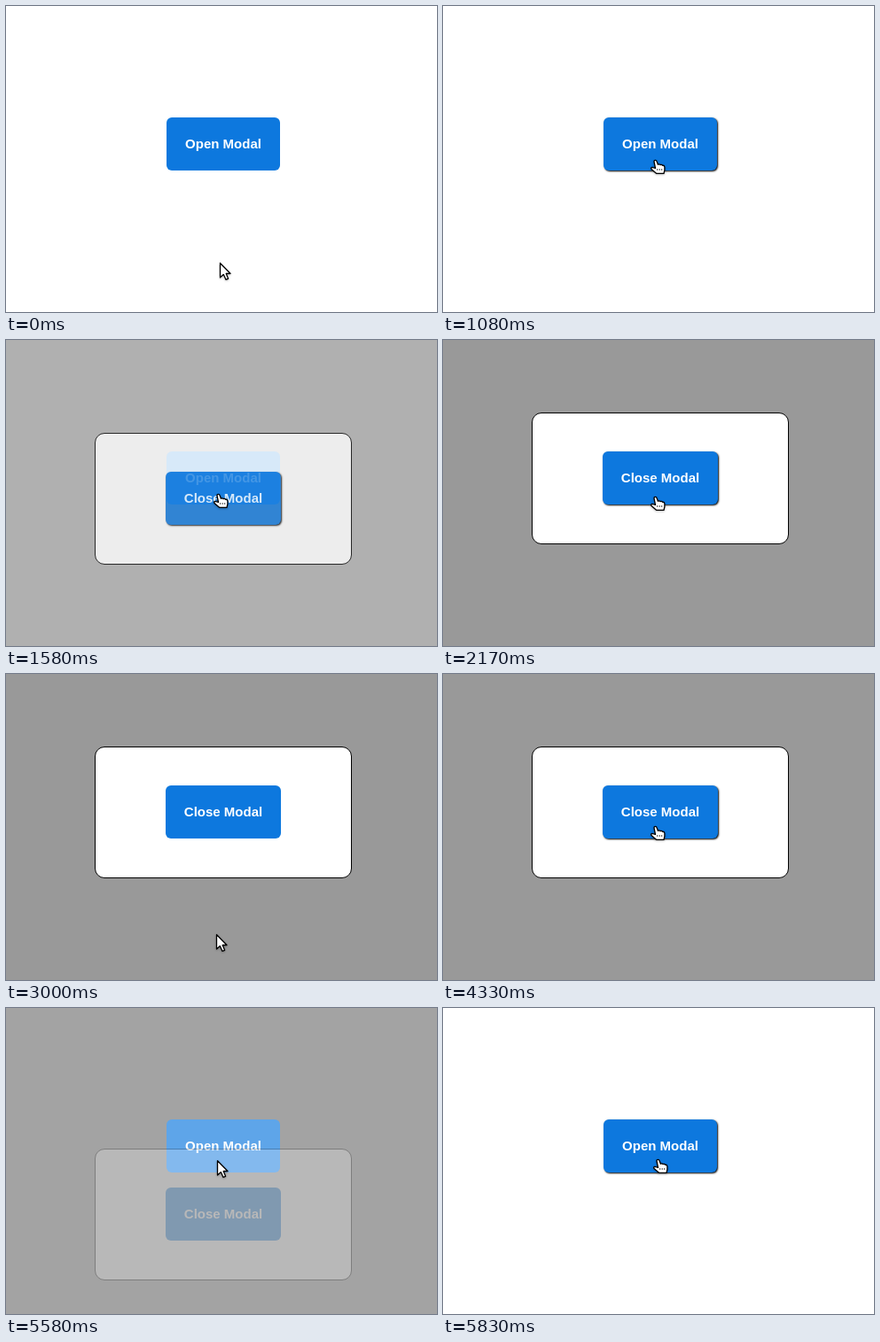
Recreate the animation shown at these times as an HTML page. Size 486 by 346 pixels, loop 7760 ms.

```html
<!DOCTYPE html>
<html lang="en">
<head>
<meta charset="utf-8">
<title>Modal</title>
<style>
  html, body { margin: 0; width: 100%; height: 100%; overflow: hidden; background: #fff; }
  #backdrop { position: absolute; inset: 0; background: #000; }
  .box {
    position: absolute; left: 100px; top: 82px; width: 290px; height: 149px;
    box-sizing: border-box; border: 1px solid transparent; border-radius: 11px;
    display: flex; justify-content: center; align-items: flex-start;
  }
  #modal { background: #fff; border-color: #000; }
  .button {
    margin-top: 43px; padding: 0 21px; border-radius: 6px; background: #0d78de; color: #fff;
    font: bold 15px/60px "Liberation Sans", Arial, sans-serif; white-space: nowrap;
  }
  .hover { box-shadow: 1px 1px 2px #000; }
  svg { position: absolute; left: 0; top: 0; overflow: visible; }
  svg path { fill: #fff; stroke: #000; stroke-width: 1.3; stroke-linejoin: round; }
  #cursor { filter: drop-shadow(0 1px 1px rgba(0, 0, 0, .25)); }
</style>
</head>
<body>
<div id="backdrop"></div>
<div class="box"><div class="button" id="open">Open Modal</div></div>
<div class="box" id="modal"><div class="button" id="close">Close Modal</div></div>
<svg width="486" height="346">
  <g id="cursor">
    <path id="arrow" d="M.5 .7V17L4.3 13.6L7 19.4L9.6 18.3L7.2 12.5H12Z"/>
    <g id="hand">
      <path d="M0 2Q0 .4 1.4 .4Q2.8 .4 3.2 2L4.4 5.3Q6 4.2 7 5.6Q8.8 4.8 9.5 6.3Q11.6 6 11.9 8V11.5L11 15.3H2.5L-3 10.5Q-4 8.4 -2 8.3L1.5 9.5Z"/>
      <path d="M3.7 10v2M6.2 10v2M8.7 10v2" style="stroke-width:.7"/>
    </g>
  </g>
</svg>
<script>
const LOOP = 7760, FPS = 12, SLIDE = 100, DIM = 0.4;
const [backdrop, open, modal, close, cursor, arrow, hand] =
  ["backdrop", "open", "modal", "close", "cursor", "arrow", "hand"].map(id => document.getElementById(id));

const clamp = x => Math.min(1, Math.max(0, x));
const easeOut = x => 1 - (1 - x) ** 1.7;
const easeInOut = x => x * x * (3 - 2 * x);

// Pointer moves: first tick, last tick, x, y
const moves = [
  [1, 10, 235, 174], [12, 13, 238, 174],
  [25, 35, 238, 292], [35, 36, 237, 294],
  [39, 48, 239, 173], [51, 52, 238, 172],
  [68, 69, 241, 171]
];

function pointerAt(tick) {
  let x = 241, y = 290;
  for (const [from, to, toX, toY] of moves) {
    const p = easeInOut(clamp((tick - from) / (to - from)));
    x += (toX - x) * p;
    y += (toY - y) * p;
  }
  return [x, y];
}

function render(time) {
  const tick = Math.floor((time % LOOP + 4) * FPS / 1000);
  const opening = clamp((tick - 15.5) / 6);
  const closing = clamp((tick - 63.5) / 6);
  const shown = easeOut(opening) - easeOut(closing);
  // The backdrop leaves later than the modal
  const dim = easeOut(opening) - clamp((closing - 0.4) / 0.6) ** 2;
  const offset = SLIDE * (1 - shown);
  const active = opening > 0 && closing < 1;

  backdrop.style.opacity = DIM * dim;
  const lighten = c => c + (255 - c) * 0.37 * dim;
  open.style.background = `rgb(${[13, 120, 222].map(lighten)})`;
  modal.style.opacity = shown;
  modal.style.transform = `translateY(${Math.round(offset)}px)`;

  const [x, y] = pointerAt(tick);
  const top = 126 + (active ? offset : 0);
  const hover = y >= top && y < top + 60;
  open.classList.toggle("hover", hover && !active);
  close.classList.toggle("hover", hover && active);
  cursor.setAttribute("transform", `translate(${Math.round(x)} ${Math.round(y)})`);
  arrow.style.display = hover ? "none" : "";
  hand.style.display = hover ? "" : "none";
}

const start = performance.now();
(function loop() {
  render(performance.now() - start);
  requestAnimationFrame(loop);
})();
</script>
</body>
</html>
```
